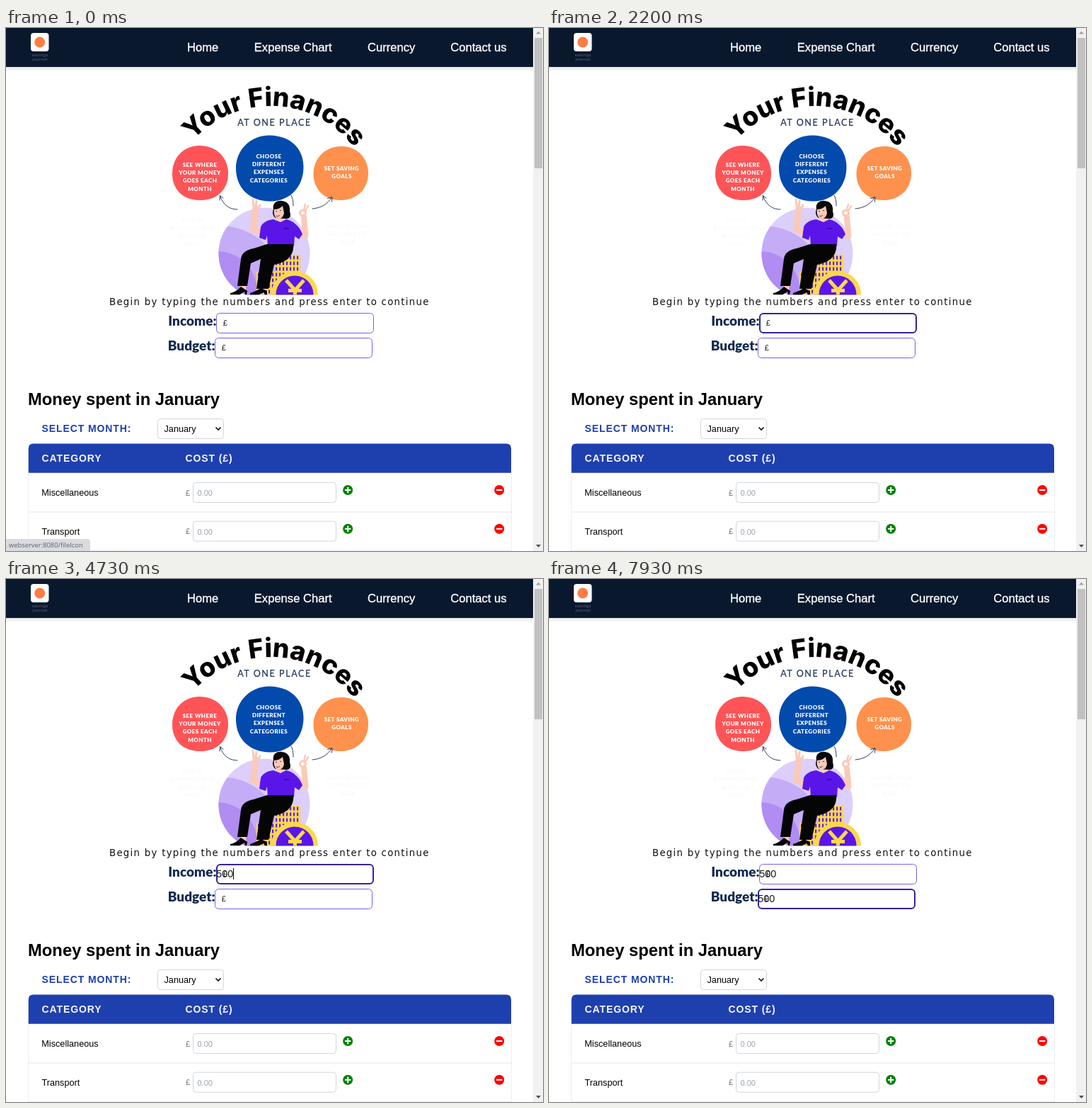
Animation of 759x738 px, one loop 8000 ms. Source, as an HTML page:

```html
<!DOCTYPE html>
<html lang="en">
<head>
<meta charset="utf-8">
<title>Monthly budget form</title>
<style>
html, body { margin: 0; width: 100%; height: 100%; overflow: hidden; background: #fff; }
svg { display: block; width: 759px; height: 738px; font-family: "Liberation Sans", Arial, sans-serif; }
.nav { font-size: 16.6px; fill: #fff; stroke: #fff; stroke-width: .35px; }
.brand { font-size: 6px; fill: #5b6478; text-anchor: middle; letter-spacing: .4px; }
.arc { font: 800 37px Inter, sans-serif; text-anchor: middle; }
.sub { font: 12.6px Lato, sans-serif; letter-spacing: 1.55px; fill: #22355c; stroke: #22355c; stroke-width: .2px; text-anchor: middle; }
.blob { font: 900 8px Lato, sans-serif; letter-spacing: .45px; fill: #fff; text-anchor: middle; }
.ghost { fill: #fafafa; }
.hint { font: 13.3px "DejaVu Sans", Verdana, sans-serif; letter-spacing: 1.28px; fill: #111; }
.label { font: 900 19px Lato, sans-serif; fill: #12294f; text-anchor: end; }
.title { font-size: 23.8px; font-weight: 700; }
.caps { font-size: 14px; font-weight: 700; letter-spacing: .9px; }
.cell { font-size: 12.7px; }
.small { font-size: 11px; }
.value { font-size: 14.4px; fill: #1a1a1a; }
.status { font: 9.4px "Open Sans", sans-serif; fill: #5f6368; }
.frame { fill: none; stroke: #7460ee; }
.focus .frame { stroke: #32249a; stroke-width: 2; }
.box { fill: #fff; stroke: #d1d5db; }
.line { fill: none; stroke: #2c3e5f; stroke-width: 1; stroke-linecap: round; }
</style>
</head>
<body>
<svg viewBox="0 0 759 738" xmlns="http://www.w3.org/2000/svg">
  <defs>
    <linearGradient id="shade" x2="0" y2="1">
      <stop offset="0" stop-color="#000" stop-opacity=".09"/>
      <stop offset="1" stop-color="#000" stop-opacity="0"/>
    </linearGradient>
    <pattern id="coins" width="5" height="8" patternUnits="userSpaceOnUse">
      <rect width="5" height="8" fill="#fbd84d"/>
      <rect x="1" y="1.5" width="2.2" height="5" fill="#6320e6"/>
    </pattern>
    <clipPath id="disc"><circle cx="365" cy="318" r="64.5"/></clipPath>
    <clipPath id="art"><rect x="220" y="60" width="310" height="316.5"/></clipPath>
    <path id="curve" d="M245.8 184A148 148 0 0 1 508.1 195.5"/>
    <g id="row">
      <text class="small" x="254" y="659.5" fill="#6b7280">£</text>
      <rect class="box" x="264.5" y="641.5" width="202" height="28" rx="4"/>
      <text class="small" x="270.5" y="660" fill="#9ca3af">0.00</text>
      <circle cx="483.2" cy="652" r="7" fill="#008000"/>
      <path d="M479 652h8.4M483.2 647.8v8.4" stroke="#fff" stroke-width="2"/>
      <circle cx="697.2" cy="652" r="7" fill="#f00"/>
      <path d="M693 652h8.4" stroke="#fff" stroke-width="2"/>
      <path d="M31 683H715" stroke="#e5e7eb"/>
    </g>
  </defs>
  <rect width="759" height="738" fill="#fff"/>

  <!-- header -->
  <rect y="55" width="745" height="7" fill="url(#shade)"/>
  <rect width="745" height="55" fill="#0a182e"/>
  <rect x="35" y="7" width="25.5" height="26" rx="4" fill="#fff"/>
  <circle cx="47.7" cy="20" r="7.5" fill="#ff7d45"/>
  <text class="brand" x="48" y="39.5">savings</text>
  <text class="brand" x="48" y="46">journal</text>
  <g class="nav">
    <text x="256" y="33.4">Home</text>
    <text x="350.8" y="33.4">Expense Chart</text>
    <text x="511" y="33.4">Currency</text>
    <text x="628.3" y="33.4">Contact us</text>
  </g>

  <!-- illustration -->
  <g clip-path="url(#art)">
    <text class="arc"><textPath href="#curve" startOffset="50%">Your Finances</textPath></text>
    <text class="sub" x="379.5" y="137.700">AT ONE PLACE</text>
    <path fill="#fe5457" d="M272 166C293 165 313 179 314 203C315 227 299 243 276 243C252 244 235 229 235 206C235 183 250 167 272 166Z"/>
    <path fill="#034aad" d="M373 151.500C400 152 420 168 420.500 195C421 224 401 245 373 244.500C344 244 326 226 325 200C324 172 346 151 373 151.500Z"/>
    <path fill="#fe914d" d="M474 167C497 167 512 184 512 205C512 228 495 243 472 243C450 243 434 227 434.500 205C435 183 452 167 474 167Z"/>
    <g id="blobs"></g>

    <g clip-path="url(#disc)">
      <rect x="300" y="250" width="131" height="130" fill="#dccffb"/>
      <circle cx="302" cy="372" r="93" fill="#c5acf7"/>
      <circle cx="298" cy="372" r="57" fill="#b08cf3"/>
    </g>
    <path class="line" d="M327 256C316 256 307 250 302.500 237M302 243L302.500 236.500L307 240"/>
    <path class="line" d="M433 255C445 254 454 249 460 239.500M454.500 240.500L461 238.500L460.500 245"/>
    <path class="line" d="M403 236C405.500 240 406 245 406 251"/>

    <rect x="380" y="320" width="36" height="56" fill="url(#coins)"/>
    <rect x="354" y="344" width="32" height="32" fill="url(#coins)"/>

    <!-- seated figure -->
    <g fill="none" stroke="#fbc9b8" stroke-linecap="round" stroke-linejoin="round">
      <path d="M353 255L349.500 284L364 290" stroke-width="9"/>
      <path d="M421 267L423.500 293L410 284" stroke-width="8"/>
      <path d="M350 252L349 242M353 251L354 244M357 255L359 250" stroke-width="3"/>
      <circle cx="419.500" cy="261" r="4" stroke-width="3"/>
      <path d="M423 258L427 251M421 257L423 249" stroke-width="2.500"/>
    </g>
    <path fill="#fbc9b8" d="M382 262h13v12h-13z"/>
    <path fill="#5a16e9" d="M378 270C369 271 362 275 360 281L358 296L367 299L369 293L370 308H407L408 294L414 298L419 291C415 280 406 272 396 270L388 274Z"/>
    <path fill="#08080a" d="M378 256C376 247 383 243 390 244C399 245 402 251 401 259C404 266 400 270 394 269L381 268C377 265 376 260 378 256Z"/>
    <path fill="#fbc9b8" d="M379 256C384 256 388 254 391 251L393 261C392 268 386 271 382 268C379 265 378 260 379 256Z"/>
    <path d="M382 265q3 2 5-1M381 258.500h2M387 257.500h2" fill="none" stroke="#222" stroke-width=".8"/>
    <path d="M393 283h7" stroke="#2d0b88" stroke-width="1.500"/>
    <path fill="#fbc9b8" d="M331 360h9l-1 12h-8zM357 362h8l3 10h-8z"/>
    <path fill="#050506" d="M369 305H406C408 321 396 331 379 334L371 368H354L360 326L346 332L341 364H327L332 326C333 317 340 313 350 311Z"/>
    <path fill="#050506" d="M317 374C324 373 329 368 332 365L341 371L340 376H338L337 372L330 376.500H317ZM345 374C352 372 357 369 360 367L369 371V376.500H366L364 373L357 376.500H345Z"/>

    <circle cx="408" cy="376" r="33" fill="#fbd84d"/>
    <circle cx="408" cy="376" r="26.500" fill="#5a16e9"/>
    <path d="M396 356L408.500 370L421 356M408.500 369V380M399 370.500H418" fill="none" stroke="#fbd84d" stroke-width="5"/>
  </g>

  <!-- income and budget -->
  <text class="hint" x="146" y="391">Begin by typing the numbers and press enter to continue</text>
  <text class="label" x="297.5" y="419.5">Income:</text>
  <text class="label" x="295.5" y="454.5">Budget:</text>
  <g id="fields"></g>

  <!-- expenses -->
  <text class="title" x="31" y="532">Money spent in January</text>
  <text class="caps" x="50.500" y="570" fill="#1e40af">SELECT MONTH:</text>
  <rect class="box" x="214.500" y="551.500" width="93" height="28" rx="4"/>
  <text class="cell" x="223.500" y="570">January</text>
  <path d="M296.500 563.500l3.500 3.500l3.500-3.500" fill="none" stroke="#111" stroke-width="1.700"/>
  <path d="M31.500 628V738M714.500 628V738" stroke="#eceef1"/>
  <path d="M31.700 627.700V593.600Q31.700 586.600 38.700 586.600H707Q714 586.600 714 593.600V627.700Z" fill="#1e40af"/>
  <text class="caps" x="50.500" y="612" fill="#f3f4f6">CATEGORY</text>
  <text class="caps" x="253.500" y="612" fill="#f3f4f6">COST (£)</text>
  <text class="cell" x="50.300" y="660">Miscellaneous</text>
  <text class="cell" x="50.500" y="714.500">Transport</text>
  <use href="#row"/>
  <use href="#row" y="54.700"/>

  <g id="popups"></g>

  <!-- browser chrome -->
  <rect x="745" width="14" height="738" fill="#f1f1f1"/>
  <rect x="747" y="14" width="11" height="184" fill="#c1c1c1"/>
  <path d="M749 8.500h7l-3.500-4z" fill="#a3a3a3"/>
  <path d="M749 729h7l-3.500 4z" fill="#505050"/>
  <g id="status">
    <path d="M0 721H115Q119 721 119 725V738H0Z" fill="#d9dbdf"/>
    <text class="status" x="4" y="733">webserver:8080/fileIcon</text>
  </g>
</svg>

<script>
const LOOP = 8000;
const byId = id => document.getElementById(id);

// [centre x, first baseline, lines, class]
const captions = [
  [274, 195.5, ["SEE WHERE", "YOUR MONEY", "GOES EACH", "MONTH"], "blob"],
  [371.5, 183.5, ["CHOOSE", "DIFFERENT", "EXPENSES", "CATEGORIES"], "blob"],
  [474.5, 201, ["SET SAVING", "GOALS"], "blob"],
  [264, 274, ["CHECK", "A MONTH AND", "A SINGLE", "WEEK"], "blob ghost"],
  [483, 283, ["CHOOSE YOUR", "AMOUNT TO", "KEEP"], "blob ghost"]
];
byId("blobs").innerHTML = captions.map(([x, y, lines, cls]) =>
  lines.map((s, i) => `<text class="${cls}" x="${x}" y="${y + i * 11.4}">${s}</text>`).join("")
).join("");

// Each step is [start ms, value]
const statusSteps = [[0, 1], [670, .65], [735, .3], [800, 0]];
const fields = [
  {
    x: 0, y: 0,
    focus: [[0, 0], [2200, 1], [4930, 0]],
    text: [[0, ""], [3270, "5"], [3470, "50"], [3670, "500"]],
    caret: [[0, 0], [2270, 1], [2730, 0], [3270, 1], [4200, 0], [4730, 1], [4930, 0]],
    popup: [[0, 0], [2270, 1], [3270, .75], [3335, .45], [3400, .15], [3470, 0]]
  },
  {
    x: -2, y: 35,
    focus: [[0, 0], [4930, 1]],
    text: [[0, ""], [5930, "5"], [6130, "50"], [6330, "500"]],
    caret: [[0, 0], [5000, 1], [5470, 0], [5930, 1], [6870, 0], [7400, 1], [7930, 0]],
    popup: [[0, 0], [5000, 1], [5930, .75], [5995, .45], [6060, .15], [6130, 0]]
  }
];

function addGroup(parent, { x, y }, html) {
  const g = document.createElementNS("http://www.w3.org/2000/svg", "g");
  g.setAttribute("transform", `translate(${x} ${y})`);
  g.innerHTML = html;
  byId(parent).append(g);
  return g;
}

for (const f of fields) {
  f.node = addGroup("fields", f, `
    <rect class="frame" rx="5"/>
    <text class="small" x="306.7" y="420" fill="#222">£</text>
    <text class="value" x="297.3" y="421"></text>
    <rect class="caret" y="408" width="1" height="16"/>`);
  f.list = addGroup("popups", f, `
    <rect x="374.5" y="437" width="49" height="37" rx="3" fill="#000" opacity=".07"/>
    <rect x="376" y="437.5" width="46.5" height="35" rx="2" fill="#fff" stroke="#d5d5d5"/>
    <path d="M384.5 438l6-4l6 4z" fill="#fff"/>
    <text x="384.3" y="459" font-size="9.5" fill="#222">100</text>`);
  f.frame = f.node.querySelector(".frame");
  f.value = f.node.querySelector(".value");
  f.mark = f.node.querySelector(".caret");
}

const at = (steps, t) => steps.reduce((v, [start, next]) => t >= start ? next : v, steps[0][1]);

function setFrame(rect, focused) {
  const inset = focused ? 1 : .5;
  rect.setAttribute("x", 297 + inset);
  rect.setAttribute("y", 402 + inset);
  rect.setAttribute("width", 223 - 2 * inset);
  rect.setAttribute("height", 29 - 2 * inset);
}

function draw(t) {
  byId("status").setAttribute("opacity", at(statusSteps, t));
  for (const f of fields) {
    const focused = at(f.focus, t);
    const text = at(f.text, t);
    f.node.setAttribute("class", focused ? "focus" : "");
    setFrame(f.frame, focused);
    f.value.textContent = text;
    f.mark.setAttribute("x", 297 + 8 * text.length);
    f.mark.setAttribute("opacity", at(f.caret, t));
    f.list.setAttribute("opacity", at(f.popup, t));
  }
}

const start = performance.now();
function tick() {
  draw((performance.now() - start) % LOOP);
  requestAnimationFrame(tick);
}
tick();
</script>
</body>
</html>
```
